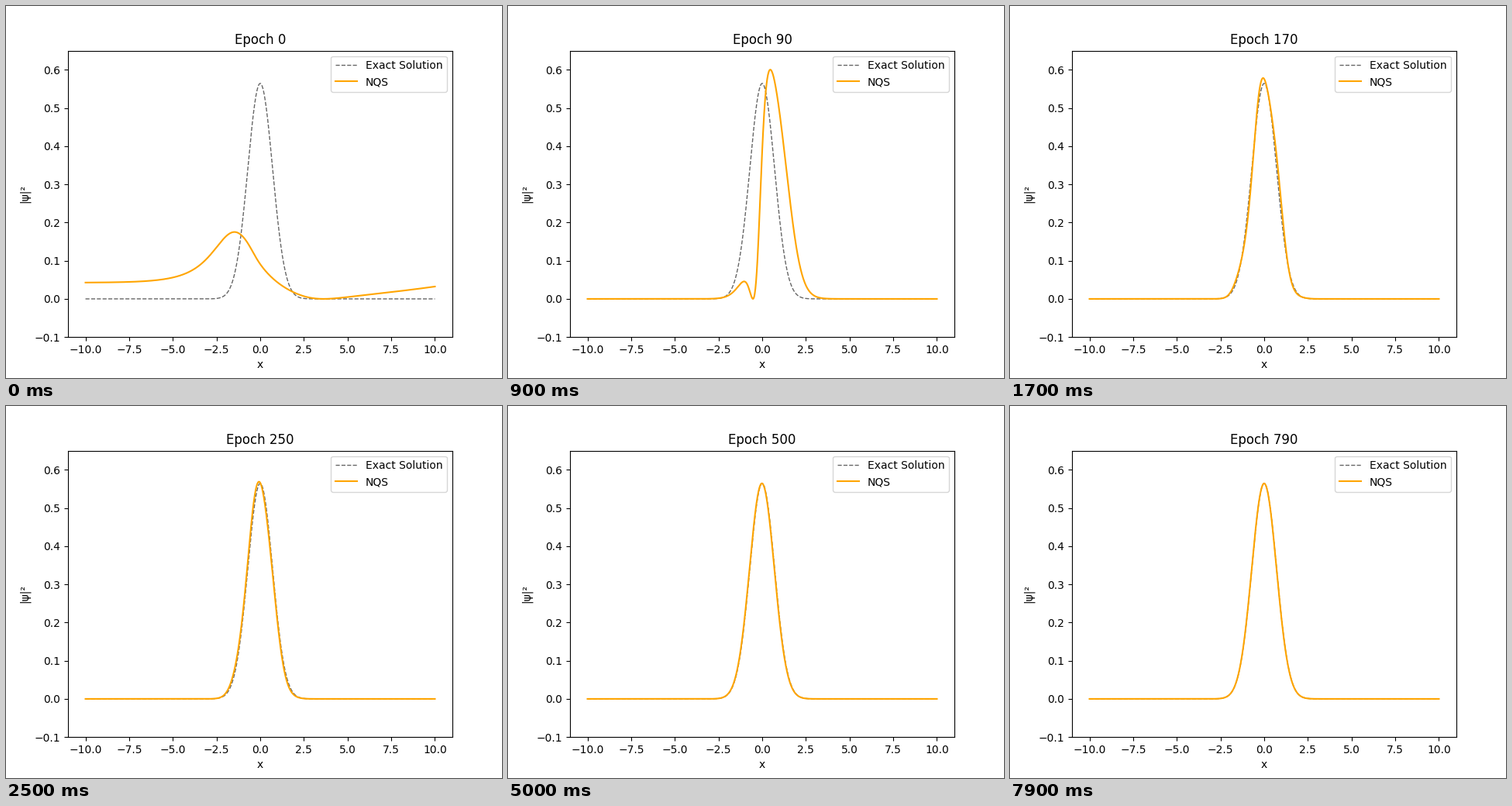
Recreate the animation shown at these times as a matplotlib script. Size 640 by 480 pixels, loop 8 s.

```python
import numpy as np
import matplotlib.pyplot as plt
from matplotlib.animation import FuncAnimation

FRAMES = 80
INTERVAL = 100
SWING, SETTLE = 9, 17  # frames where the overshoot peaks and the fit closes in

x = np.linspace(-10, 10, 1000)


def step(slope, center):
    return 1 / (1 + np.exp(-slope * (x - center)))


def ground(u):
    """Amplitude of the harmonic ground state."""
    return np.exp(-u**2 / 2) / np.pi**.25


def untrained():
    bump = .219 / np.cosh(.74 * (x + 1.42))
    slope = .0176 * np.log1p(np.exp(x))
    return .206 + bump - slope - .19 * step(1, 2.8) - .02 * step(5, -.4)


def overshoot():
    rise = 1.62 * step(4.46, -.308) - .62 * step(1.7, -1.05)
    return .85 * rise * step(-1.8, 1.8)


def settling(u):
    """Ground state with a fading ripple and a slower fading drift."""
    ripple = np.exp(-u / 7)
    drift = .086 * (1 - np.exp(-u / 4)) * np.exp(-u / 20)
    shift = -drift - .065 * ripple * np.cos(np.pi * x / .9)
    return np.sqrt(1 + .025 * ripple) * ground(x - shift)


def blend(a, b, s, rate):
    """Ease amplitude a into b while the total probability stays steady."""
    psi = a + (b - a) * (1 - (1 - s)**rate)
    total = np.sum(a**2) * (1 - s) + np.sum(b**2) * s
    return psi * np.sqrt(total / np.sum(psi**2))


def density(i):
    if i < SWING:
        # The far tails settle sooner than the centre.
        psi = blend(untrained(), overshoot(), i / SWING, 1 + (x / 4)**2)
    elif i < SETTLE:
        s = (i - SWING) / (SETTLE - SWING)
        psi = blend(overshoot(), settling(0), s, 1.4)
    else:
        psi = settling(i - SETTLE)
    return psi**2


fig, ax = plt.subplots(figsize=(6.4, 4.8), dpi=100)
ax.plot(x, ground(x)**2, color="black", lw=1, ls="--", alpha=.6,
        label="Exact Solution")
curve, = ax.plot(x, density(0), color="orange", label="NQS")
ax.set(xlim=(-11, 11), ylim=(-.1, .65), xlabel="x", ylabel="|ψ|²")
title = ax.set_title("Epoch 0")
ax.legend(loc="upper right")


def update(i):
    curve.set_ydata(density(i))
    title.set_text(f"Epoch {10 * i}")
    return curve, title


anim = FuncAnimation(fig, update, frames=FRAMES, interval=INTERVAL,
                     repeat=True, repeat_delay=0, blit=False)
plt.show()
```
